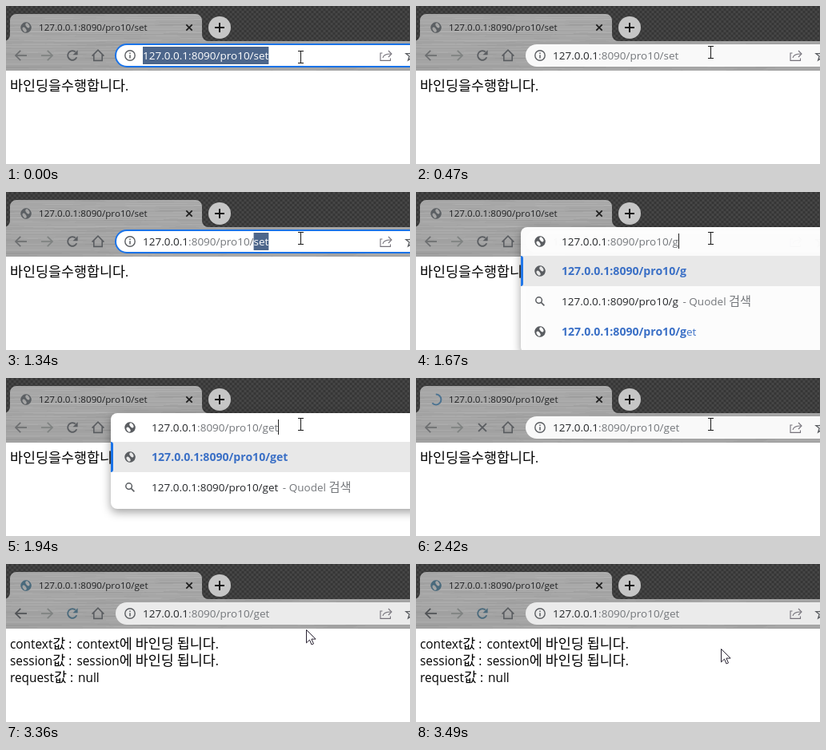
Write an HTML page with a canvas that moves like this. It is 505x198 px and loops after 3.56 s.

```html
<!DOCTYPE html>
<html lang="ko">
<head>
<meta charset="utf-8">
<title>Address bar</title>
<style>
html, body { margin: 0; width: 100%; height: 100%; overflow: hidden; background: #fff; }
canvas { display: block; width: 505px; height: 198px; }
</style>
</head>
<body>
<canvas id="stage" width="505" height="198"></canvas>
<script>
const W = 505, H = 198, LOOP = 3560, STEP = 70;
const TAU = Math.PI * 2;
const ctx = document.getElementById('stage').getContext('2d');
const LATIN = '"Open Sans", "Noto Sans", sans-serif';
const HANGUL = '"Noto Sans CJK KR", "Noto Sans CJK", sans-serif';
const HOST = '127.0.0.1', BASE = ':8090/pro10/';
const DARK = '#25272a', GREY = '#74777b', ICON = '#5a5d61', BLUE = '#1a73e8', LINK = '#3b70c6';
const URL_SIZE = 13.5, BAR_Y = 62, ROW = 38;

// Drawing helpers
function text(str, x, y, size, color, weight = 400) {
  ctx.fillStyle = color;
  for (const run of str.match(/[가-힣]+|[^가-힣]+/g) || []) {
    ctx.font = /[가-힣]/.test(run)
      ? `300 ${size * 1.13}px ${HANGUL}`
      : `${weight} ${size}px ${LATIN}`;
    ctx.fillText(run, x, y);
    x += ctx.measureText(run).width;
  }
  return x;
}

function box(x, y, w, h, r, color) {
  ctx.beginPath();
  ctx.roundRect(x, y, w, h, r);
  ctx.fillStyle = color;
  ctx.fill();
}

function at(x, y, angle, draw) {
  ctx.save();
  ctx.translate(x, y);
  ctx.rotate(angle);
  draw();
  ctx.restore();
}

function stroke(color, width, trace) {
  ctx.beginPath();
  trace();
  ctx.strokeStyle = color;
  ctx.lineWidth = width;
  ctx.stroke();
}

function line(x1, y1, x2, y2) {
  ctx.moveTo(x1, y1);
  ctx.lineTo(x2, y2);
}

function ring(x, y, r, color, width, from = 0, to = TAU) {
  stroke(color, width, () => ctx.arc(x, y, r, from, to));
}

function cross(x, y, r, angle, color, width) {
  at(x, y, angle, () => stroke(color, width, () => {
    line(-r, 0, r, 0);
    line(0, -r, 0, r);
  }));
}

function chevron(x, y, r, angle, color, width) {
  at(x, y, angle, () => stroke(color, width, () => {
    line(-r, -r, 0, 0);
    ctx.lineTo(-r, r);
  }));
}

// Fixed textures
function layer(w, h, paint) {
  const c = document.createElement('canvas');
  c.width = w;
  c.height = h;
  paint(c.getContext('2d'));
  return c;
}

function seeded(seed) {
  return () => (seed = (seed * 16807) % 2147483647) / 2147483647;
}

const weave = layer(6, 6, g => {
  for (let i = 0; i < 36; i++) {
    const x = i % 6, y = Math.floor(i / 6);
    const v = 62 + Math.round(9 * Math.sin((x / 6 + (y < 3 ? 0 : 0.5)) * TAU));
    g.fillStyle = `rgb(${v},${v},${v})`;
    g.fillRect(x, y, 1, 1);
  }
});

const brushed = layer(W, 81, g => {
  const rnd = seeded(41);
  for (let y = 0; y < 81; y++) {
    const v = Math.round(170 - y * 0.1 + (rnd() - 0.5) * 6);
    g.fillStyle = `rgb(${v},${v},${v})`;
    g.fillRect(0, y, W, 1);
    for (let k = 0; k < 5; k++) {
      g.fillStyle = rnd() < 0.5 ? 'rgba(255,255,255,.05)' : 'rgba(0,0,0,.03)';
      g.fillRect(rnd() * W - 40, y, 30 + rnd() * 120, 1);
    }
  }
});

// Icons
function globe(x, y, color) {
  at(x, y, -0.6, () => {
    ctx.beginPath();
    ctx.arc(0, 0, 6.8, 0, TAU);
    for (const side of [-1, 1]) {
      ctx.moveTo(side * 3 + 2, side * -1);
      ctx.ellipse(side * 3, side * -1, 2, 3.4, 0, 0, TAU);
    }
    ctx.fillStyle = color;
    ctx.fill('evenodd');
  });
}

function arrow(x, angle, color) {
  at(x, BAR_Y, angle, () => stroke(color, 1.7, () => line(-7, 0, 6.5, 0)));
  chevron(x + 7 * Math.cos(angle), BAR_Y, 6.2, angle, color, 1.7);
}

function reload(x, color) {
  ring(x, BAR_Y, 5.8, color, 1.8, 0.4, 5.4);
  at(x + 6.6, BAR_Y - 0.8, 0, () => {
    ctx.beginPath();
    ctx.lineTo(0, 0);
    ctx.lineTo(-6, 0);
    ctx.lineTo(0, -6);
    ctx.fillStyle = color;
    ctx.fill();
  });
}

function home(x) {
  chevron(x, BAR_Y - 6.8, 7.4, -Math.PI / 2, ICON, 1.6);
  stroke(ICON, 1.6, () => {
    line(x - 5.2, BAR_Y - 1.4, x - 5.2, BAR_Y + 6.4);
    ctx.lineTo(x + 5.2, BAR_Y + 6.4);
    ctx.lineTo(x + 5.2, BAR_Y - 1.4);
  });
}

function info(x) {
  ring(x, BAR_Y, 6.2, ICON, 1.4);
  stroke(ICON, 1.5, () => {
    line(x, BAR_Y - 3.4, x, BAR_Y - 1.9);
    line(x, BAR_Y - 0.8, x, BAR_Y + 3.4);
  });
}

function share(x) {
  at(x, BAR_Y, 0, () => stroke('#75727a', 1.1, () => {
    line(-4.5, -3, -7, -3);
    ctx.lineTo(-7, 6.4);
    ctx.lineTo(5.5, 6.4);
    ctx.lineTo(5.5, 3.6);
    ctx.moveTo(-4, 3);
    ctx.quadraticCurveTo(-3, -2, 6, -2);
  }));
  chevron(x + 7, BAR_Y - 2, 4, 0, '#75727a', 1.1);
}

function star(x) {
  stroke(ICON, 1.3, () => {
    for (let i = 0; i <= 10; i++) {
      const r = i % 2 ? 3 : 7.4, a = i * TAU / 10 - TAU / 4;
      ctx.lineTo(x + r * Math.cos(a), BAR_Y + r * Math.sin(a));
    }
  });
}

function lens(x, y) {
  ring(x - 1.4, y - 1.4, 3.8, ICON, 1.5);
  stroke(ICON, 1.6, () => line(x + 1.4, y + 1.4, x + 5.4, y + 5.4));
}

// Parts of the window
function tab(s) {
  ctx.fillStyle = ctx.createPattern(weave, 'repeat');
  ctx.fillRect(0, 0, W, 45);
  ctx.save();
  ctx.beginPath();
  ctx.moveTo(-3, 44);
  ctx.arcTo(5, 44, 5, 10, 8);
  ctx.arcTo(5, 10, 245, 10, 8);
  ctx.arcTo(245, 10, 245, 44, 8);
  ctx.arcTo(245, 44, W, 44, 8);
  ctx.lineTo(W, 44);
  ctx.lineTo(W, 81);
  ctx.lineTo(-3, 81);
  ctx.clip();
  ctx.drawImage(brushed, 0, 0);
  ctx.restore();

  if (s.loading) ring(25, 27, 6.4, '#4c7391', 2, -1.6, 2.4);
  else globe(25, 27, s.done ? '#4a6a7c' : '#5c6064');
  text(HOST + BASE + s.path, 41, 31, 11.65, '#1f2022');
  cross(229, 27, 5.2, TAU / 8, '#1c1c1c', 1.7);
  box(253, 13, 28, 28, 14, '#c6c6c6');
  cross(267, 27, 6, 0, '#151515', 2);
}

function toolbar(s) {
  arrow(19, Math.PI, s.done ? '#4e5154' : '#6c6e70');
  arrow(51, 0, '#7f8281');
  if (s.loading) cross(83, BAR_Y, 7, TAU / 8, ICON, 1.8);
  else reload(83, s.done ? '#4a6a7c' : ICON);
  home(115);
}

function address(s) {
  if (s.focus) {
    box(136, 47, 400, 30, 15, BLUE);
    box(138, 49, 396, 26, 13, '#fff');
  } else {
    box(137, 48, 400, 28, 14, s.hover ? '#f9f9f9' : '#ebebeb');
  }
  info(155);
  share(475);
  star(507);

  const x = 171, y = 67;
  const rest = s.all ? '#fff' : GREY;
  ctx.font = `${URL_SIZE}px ${LATIN}`;
  const mid = x + ctx.measureText(HOST + BASE).width;
  const end = mid + ctx.measureText(s.path).width;
  const from = s.all ? x : mid;
  if (s.all || s.word) box(from, 51, end - from, 22, 0, '#4d668b');
  text(BASE, text(HOST, x, y, URL_SIZE, s.all ? '#fff' : DARK), y, URL_SIZE, rest);
  text(s.path, mid, y, URL_SIZE, s.word ? '#fff' : rest);
  if (s.caret) box(Math.round(end), 52, 1, 19, 0, '#222');
}

function page(s) {
  ctx.fillStyle = '#fff';
  ctx.fillRect(0, 81, W, H - 81);
  ctx.wordSpacing = '2px';
  const scopes = ['context', 'session'].map(name => `${name}값 : ${name}에 바인딩 됩니다.`);
  const rows = s.done ? [...scopes, 'request값 : null'] : ['바인딩을수행합니다.'];
  rows.forEach((row, i) => text(row, 5, 106 + i * 21, 15.4, '#000'));
  ctx.wordSpacing = '0px';
}

function popup(s) {
  const rest = 'get'.slice(s.typed.length);
  const typed = BASE + s.typed;
  const rowY = i => BAR_Y - 1 + i * ROW;
  const left = 131, iconX = 155, textX = 182;
  ctx.save();
  ctx.globalAlpha = s.fade;
  ctx.shadowColor = 'rgba(0,0,0,.38)';
  ctx.shadowBlur = 12;
  ctx.shadowOffsetY = 4;
  box(left, 44, 400, 44 + ROW * (rest ? 3 : 2), 8, '#fff');
  ctx.shadowColor = 'transparent';
  box(left, 80, 400, ROW, 0, '#e8e8e8');
  box(left, 80, 3, ROW, [0, 3, 3, 0], BLUE);
  ctx.globalAlpha = 1;

  globe(iconX, BAR_Y, ICON);
  let x = text(HOST, textX, 67, URL_SIZE, DARK);
  x = text(typed, x, 67, URL_SIZE, GREY);
  box(Math.round(x), 52, 1, 19, 0, '#222');

  globe(iconX, rowY(1), ICON);
  text(HOST + typed, textX, rowY(1) + 5, 14.1, LINK, 700);
  lens(iconX, rowY(2));
  x = text(HOST + typed, textX, rowY(2) + 5, URL_SIZE, DARK);
  text(' - Quodel 검색', x + 2, rowY(2) + 5, URL_SIZE, GREY);
  if (rest) {
    globe(iconX, rowY(3), ICON);
    x = text(HOST + typed, textX, rowY(3) + 5, 14.1, LINK, 700);
    text(rest, x, rowY(3) + 5, URL_SIZE, LINK);
  }
  ctx.restore();
}

function beam(x, y) {
  stroke('#1a1a1a', 1, () => {
    line(x, y, x, y + 15);
    for (const end of [y, y + 15]) line(x - 3.5, end, x + 3.5, end);
  });
}

function pointer(x, y) {
  at(x, y, 0, () => {
    const shape = new Path2D('M0 0V16.4L4 12.6L6.5 18.5L9 17.4L6.4 11.6H11.6Z');
    ctx.fillStyle = '#fff';
    ctx.fill(shape);
    ctx.strokeStyle = '#2a2433';
    ctx.lineWidth = 1;
    ctx.stroke(shape);
  });
}

const within = (t, from, to) => t >= from && t < to;
const easeOut = p => 1 - (1 - p) ** 2;
const steps = (t, from) => Math.min(2, Math.floor((t - from) / (STEP - 5))) / 2;

function stateAt(t) {
  const keys = [1670, 1870, 1940].filter(key => t >= key).length;
  return {
    focus: t < 400 || within(t, 1200, 1670),
    all: t < 400 || within(t, 1270, 1340),
    word: within(t, 1340, 1670),
    caret: within(t, 1200, 1270),
    loading: within(t, 400, 470) || within(t, 2420, 2480),
    typed: t < 2420 ? 'get'.slice(0, keys) : '',
    fade: t < 1740 ? 0.97 : 1,
    path: t < 2420 ? 'set' : 'get',
    done: t >= 2480,
    hover: t < 3360
  };
}

function render(t) {
  const s = stateAt(t);
  tab(s);
  toolbar(s);
  page(s);
  address(s);
  if (s.typed) popup(s);
  if (s.hover) {
    beam(368.5, 56.5 - 3 * Math.min(2, Math.floor(t / STEP)));
  } else {
    const p = easeOut(steps(t, 3360));
    pointer(375.5 + 6 * p, 82.5 + 24 * p);
  }
}

const begin = performance.now();
function tick() {
  render((performance.now() - begin) % LOOP);
  requestAnimationFrame(tick);
}
tick();
</script>
</body>
</html>
```
